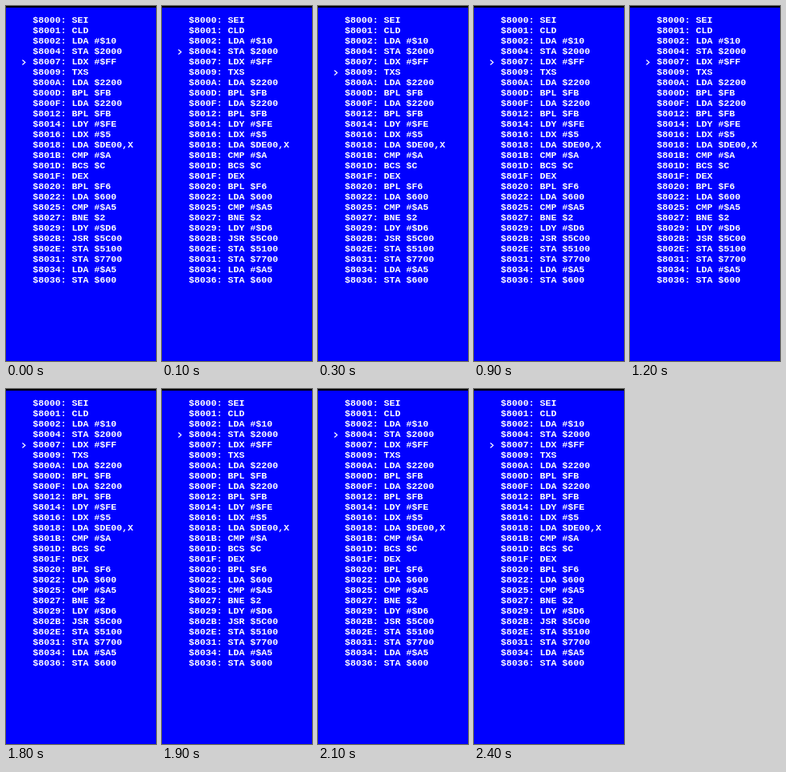
Recreate the animation shown at these times as an HTML page. Size 188 by 444 pixels, loop 2700 ms.

```html
<!DOCTYPE html>
<html lang="en">
<head>
<meta charset="utf-8">
<title>Disassembly</title>
<style>
  html, body { margin: 0; width: 100%; height: 100%; overflow: hidden; background: #00f; }
  #top { position: absolute; left: 0; top: 0; width: 100%; height: 2px; background: #000; }
  #code, #cursor {
    position: absolute; top: 12px; margin: 0; color: #fff; white-space: pre;
    font: bold 11.667px/13px "Liberation Mono", monospace;
  }
  #code { left: 33.5px; }
  #cursor { left: 19px; width: 7px; height: 13px; }
  #cursor path { fill: none; stroke: #fff; stroke-width: 1.2; }
</style>
</head>
<body>
<div id="top"></div>
<pre id="code">$8000: SEI
$8001: CLD
$8002: LDA #$10
$8004: STA $2000
$8007: LDX #$FF
$8009: TXS
$800A: LDA $2200
$800D: BPL $FB
$800F: LDA $2200
$8012: BPL $FB
$8014: LDY #$FE
$8016: LDX #$5
$8018: LDA $DE00,X
$801B: CMP #$A
$801D: BCS $C
$801F: DEX
$8020: BPL $F6
$8022: LDA $600
$8025: CMP #$A5
$8027: BNE $2
$8029: LDY #$D6
$802B: JSR $5C00
$802E: STA $5100
$8031: STA $7700
$8034: LDA #$A5
$8036: STA $600</pre>
<svg id="cursor" viewBox="0 0 7 13"><path d="M1.5 3.5 L5 6.5 L1.5 9.5"/></svg>
<script>
  const LOOP = 2700, TICK = 100, ROW = 13, HOME = 4;
  const cursor = document.getElementById("cursor");
  const start = performance.now();

  // The cursor rests twice per loop; otherwise it climbs in bursts of three ticks.
  function rowAt(t) {
    const tick = Math.floor(t / TICK);
    if (tick >= 3 && tick < 9) return HOME + 1;
    if (tick >= 24) return HOME;
    const burstRow = tick < 21 ? HOME : HOME - 1;
    return burstRow - tick % 3;
  }

  function draw(now) {
    const t = Math.max(0, now - start) % LOOP;
    cursor.style.transform = `translateY(${rowAt(t) * ROW}px)`;
    requestAnimationFrame(draw);
  }
  draw(start);
</script>
</body>
</html>
```
